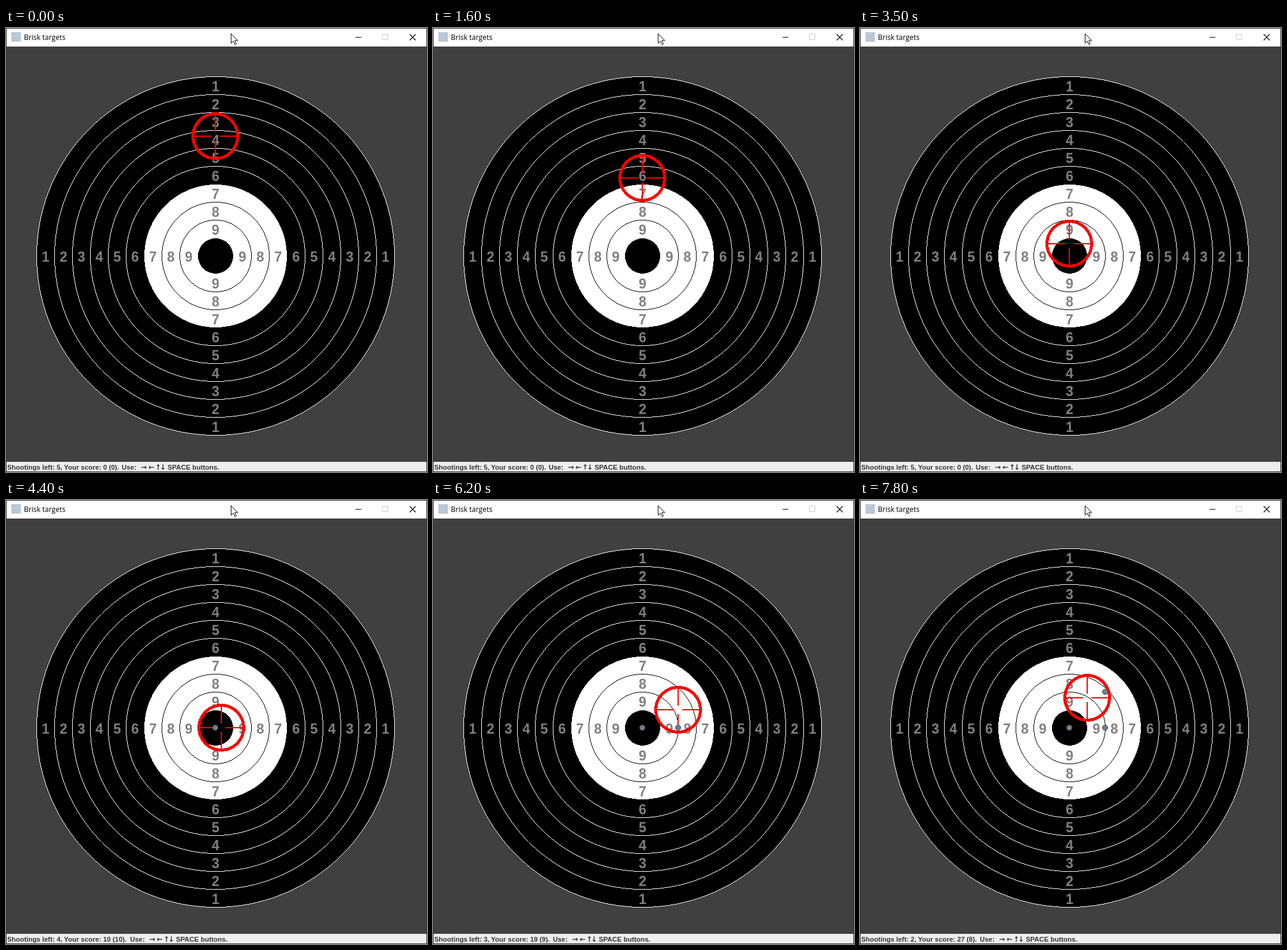
Animation of 706x743 px, one loop 8 s. Source, as an HTML page:

```html
<!DOCTYPE html>
<html lang="en">
<head>
<meta charset="utf-8">
<title>Brisk targets</title>
<style>
  html, body { margin: 0; width: 100%; height: 100%; overflow: hidden; background: #404040; }
  svg { display: block; }
  .crisp { shape-rendering: crispEdges; }
  .title { font: 12px "Open Sans", "Noto Sans", sans-serif; }
  .digits { font: bold 23px "Liberation Sans", Arial, sans-serif; fill: #808080; text-anchor: middle; }
  .status { font: bold 11.4px "Liberation Sans", Arial, sans-serif; fill: #333; }
  .arrows { font: bold 12px "DejaVu Sans", sans-serif; text-anchor: middle; }
</style>
</head>
<body>
<svg width="706" height="743" viewBox="0 0 706 743">
  <rect width="706" height="743" fill="#303030"/>
  <rect x="1" y="1" width="704" height="30" fill="#fff"/>
  <rect x="1" y="31" width="704" height="695" fill="#404040"/>
  <rect x="1" y="726" width="704" height="16" fill="#eee"/>

  <rect x="9" y="7" width="16" height="16" fill="#b9c8d6"/>
  <text class="title" x="30" y="20">Brisk targets</text>
  <g fill="none" stroke="#000">
    <path d="M586 15.5h10"/>
    <rect x="631.5" y="10.5" width="9" height="9" stroke="#ccc"/>
    <path d="M677 10.5l10 10M687 10.5l-10 10" stroke-width="1.1"/>
  </g>
  <path d="M377.5 9.5v16l3.7-3.5 2.7 5.8 2.4-1.1-2.6-5.7h5z" fill="#fff" stroke="#000"/>

  <g id="target" class="crisp"></g>
  <g id="digits" class="digits"></g>
  <g id="sight" class="crisp" fill="none" stroke="#f00">
    <circle r="37.5" stroke-width="5"/>
    <path d="M-37 0h30M7 0h30M0-37v30M0 7v30" stroke-width="2"/>
  </g>
  <g id="holes" fill="#708090" stroke="#2f4f4f"></g>

  <g class="status">
    <text id="score" x="2" y="739"></text>
    <g id="hint">
      <text x="194" y="739">Use:</text>
      <g class="arrows">
        <text x="231" y="739">→</text>
        <text x="244" y="739">←</text>
        <text x="255" y="739">↑</text>
        <text x="263" y="739">↓</text>
      </g>
      <text x="271" y="739">SPACE buttons.</text>
    </g>
  </g>
</svg>
<script>
const LOOP = 8000, STEP = 10, CX = 351.5, CY = 381.5, BAND = 30;
const byId = id => document.getElementById(id);

function add(parent, tag, attrs, text = "") {
  const node = document.createElementNS("http://www.w3.org/2000/svg", tag);
  for (const key in attrs) node.setAttribute(key, attrs[key]);
  node.textContent = text;
  parent.append(node);
  return node;
}

function disc(r, fill) {
  add(byId("target"), "circle", { cx: CX, cy: CY, r, fill });
}

// One-pixel outline without smoothing, plotted octant by octant.
function ring(r, fill) {
  let d = "";
  const plot = (x, y) => { d += `M${CX - 0.5 + x} ${CY - 0.5 + y}h1v1h-1z`; };
  for (let a = 0; a <= r * Math.SQRT1_2; a++) {
    const b = Math.round(Math.sqrt(r * r - a * a));
    for (const sa of [a, -a])
      for (const sb of [b, -b]) {
        plot(sa, sb);
        plot(sb, sa);
      }
  }
  add(byId("target"), "path", { d, fill });
}

disc(300, "#000");
for (let n = 1; n <= 6; n++) ring((11 - n) * BAND, "#fff");
disc(119.5, "#fff");
ring(90, "#000");
ring(60, "#000");
disc(29.5, "#000");

for (let n = 1; n <= 9; n++) {
  const d = (10.5 - n) * BAND;
  for (const [dx, dy] of [[0, -d], [0, d], [-d, 0], [d, 0]])
    add(byId("digits"), "text", { x: CX + dx, y: CY + dy + 9.5 }, n);
}

// Key presses: direction, first time, last time, count (evenly repeated).
const moves = [
  ["down", 400, 400, 1],
  ["down", 800, 1800, 7],
  ["down", 1900, 2400, 4],
  ["down", 2700, 3600, 7],
  ["down", 3800, 3800, 1],
  ["right", 4400, 4500, 2],
  ["right", 4800, 5300, 4],
  ["up", 5900, 6200, 3],
  ["up", 6400, 6600, 2],
  ["up", 6800, 6800, 1],
  ["left", 7400, 7700, 3],
  ["down", 7800, 7800, 1],
];
const vectors = { down: [0, 1], up: [0, -1], left: [-1, 0], right: [1, 0] };
const shots = [
  { at: 4100, x: 351, y: 381, points: 10 },
  { at: 5700, x: 411, y: 381, points: 9 },
  { at: 7200, x: 411, y: 321, points: 8 },
];
for (const shot of shots)
  shot.hole = add(byId("holes"), "circle", { cx: shot.x, cy: shot.y, r: 4.5 });

function pressed(t, first, last, count) {
  let done = 0;
  for (let i = 0; i < count; i++) {
    const at = first + (last - first) * i / Math.max(1, count - 1);
    if (t >= Math.round(at / 100) * 100) done++;
  }
  return done;
}

function render(t) {
  let x = 351, y = 181;
  for (const [dir, first, last, count] of moves) {
    const distance = STEP * pressed(t, first, last, count);
    x += vectors[dir][0] * distance;
    y += vectors[dir][1] * distance;
  }
  byId("sight").setAttribute("transform", `translate(${x} ${y})`);

  let left = 5, total = 0, latest = 0;
  for (const { at, points, hole } of shots) {
    const fired = t >= at;
    hole.setAttribute("visibility", fired ? "visible" : "hidden");
    if (fired) {
      left--;
      total += points;
      latest = points;
    }
  }
  byId("score").textContent = `Shootings left: ${left}, Your score: ${total} (${latest}).`;
  const extraDigits = `${total}${latest}`.length - 2;
  byId("hint").setAttribute("transform", `translate(${extraDigits * 7} 0)`);
}

const start = performance.now();
function tick() {
  render((performance.now() - start) % LOOP);
  requestAnimationFrame(tick);
}
tick();
</script>
</body>
</html>
```
